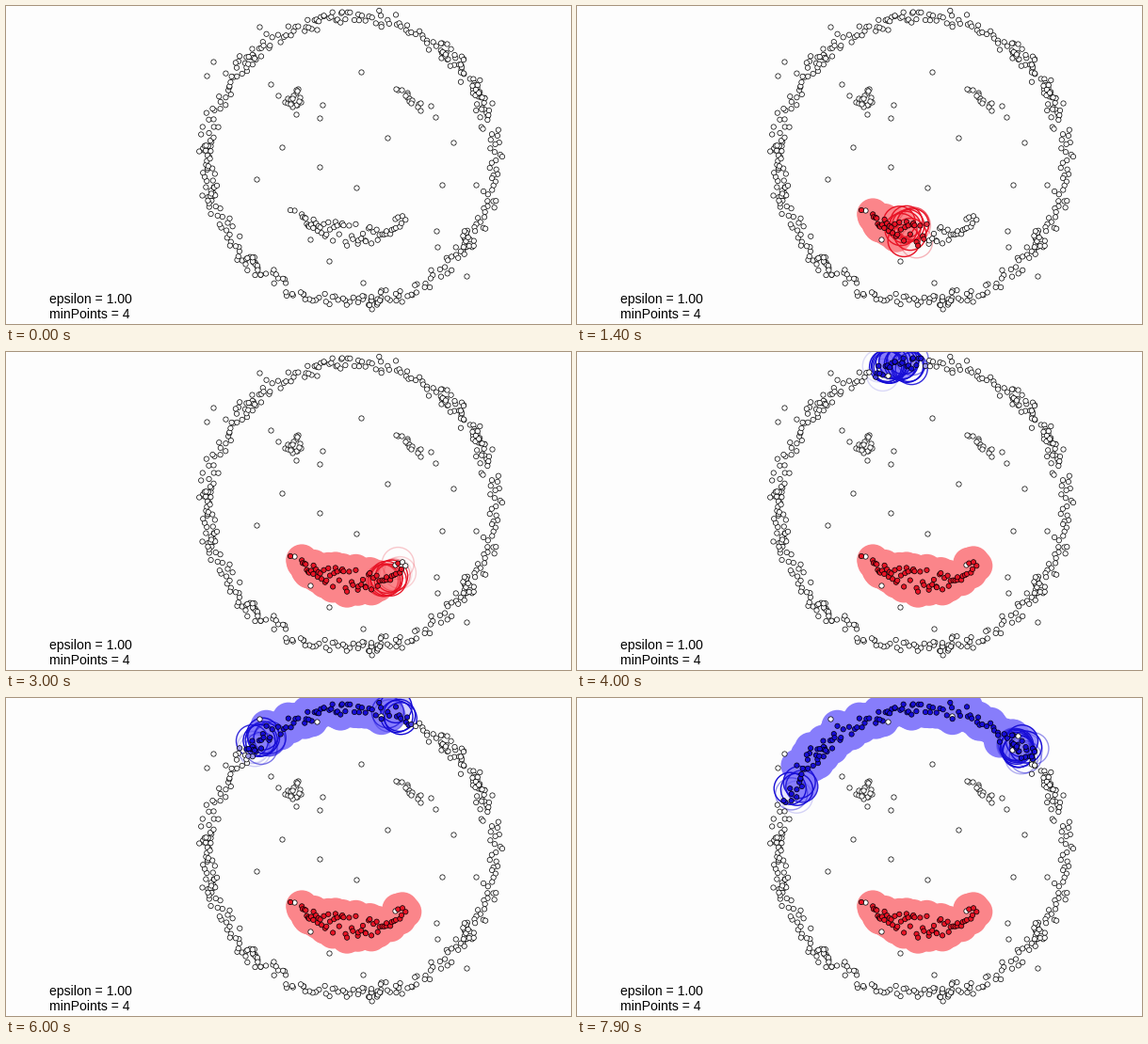
Recreate the animation shown at these times as a matplotlib script. Size 600 px wide and 338 px high, loop 8 s.

```python
import numpy as np
import matplotlib.pyplot as plt
from matplotlib.animation import FuncAnimation

W, H, DPI = 600, 338, 64
PT = 72 / DPI              # points per pixel
STEP, FRAMES = 100, 80
EPS, MIN_PTS = 17, 4
CX, CY, R = 366, 163, 152  # face outline
BG = "#fdfdfd"
RED, PALE_RED = (0.91, 0.08, 0.15), (0.985, 0.52, 0.54)
BLUE, PALE_BLUE = (0.09, 0.05, 0.84), (0.53, 0.49, 0.985)

rng = np.random.default_rng(12)


def spread(n):
    """n sorted random values that cover 0..1 evenly."""
    return (np.arange(n) + rng.random(n)) / n


def make_noise(cells=6):
    """One loose point per cell of a coarse grid."""
    cell = np.stack(np.meshgrid(range(cells), range(cells)), -1).reshape(-1, 2)
    return [207, 14] + (cell + rng.random(cell.shape)) / cells * [313, 284]


def make_eyes():
    left = rng.normal((304, 100), (7, 7), (21, 2))
    u = spread(15)[:, None]
    right = (417, 89) + u * (24, 19) + rng.normal(0, 3, (15, 2))
    return np.vstack([left, right])


def make_mouth(n=60):
    """A sagging band, thick in the middle, with one stray at its left end."""
    u = spread(n) ** 1.15
    mid = 225 + 72 * u * (1 - u)
    half = 4 + 9 * np.sin(np.pi * u)
    y = mid + half * rng.uniform(-1, 1, n)
    return np.vstack([(302, 217), np.column_stack([314 + 111 * u, y])])


def make_ring():
    """Even outline plus denser clumps; angles run clockwise from the left."""
    clumps = [(4, 10), (45, 12), (76, 6), (136, 14), (155, 16), (215, 18),
              (257, 14), (315, 9), (345, 9)]
    deg = np.concatenate([360 * spread(290)] +
                         [rng.normal(a, 4, n) for a, n in clumps])
    a = np.radians(deg)
    r = R + np.clip(rng.normal(0, 4.5, len(a)), -9, 9)
    return deg, np.column_stack([CX - r * np.cos(a), CY - r * np.sin(a)])


def rgba(color, alpha):
    return np.column_stack([np.tile(color, (len(alpha), 1)), alpha])


def ramp(t, length):
    return np.clip(t / length, 0, 1)


def draw_dots(xy):
    return ax.scatter(*xy.T, s=(5.3 * PT) ** 2, facecolor="white",
                      edgecolor="black", lw=0.7 * PT, zorder=3)


class Cluster:
    """Points scanned by a front that moves away from a seed point."""

    def __init__(self, xy, scan, color, pale):
        dist = np.linalg.norm(xy[:, None] - xy[None], axis=2)
        near = dist <= EPS
        core = near.sum(1) >= MIN_PTS
        scan = np.where(core, scan + rng.uniform(-90, 90, len(xy)), np.inf)
        self.found = np.where(near, scan, np.inf).min(1) + 60
        self.scan = scan[core]
        self.color, self.pale = color, pale
        size = (2 * EPS * PT) ** 2
        self.discs = ax.scatter(*xy[core].T, s=size, lw=0, zorder=1)
        self.rings = ax.scatter(*xy[core].T, s=size, lw=1.4 * PT, zorder=2,
                                facecolor="none")
        self.dots = draw_dots(xy)

    def show(self, t):
        age = t - self.scan
        line = ramp(age + 50, 200) * ramp(600 - age, 150)
        self.discs.set_facecolor(rgba(self.pale, ramp(age - 250, 250)))
        self.rings.set_edgecolor(rgba(self.color, line))
        k = ramp(t - self.found, 150)[:, None]
        self.dots.set_facecolor(1 - k * (1 - np.array(self.color)))


fig = plt.figure(figsize=(W / DPI, H / DPI), dpi=DPI, facecolor=BG)
ax = fig.add_axes([0, 0, 1, 1])
ax.set(xlim=(0, W), ylim=(H, 0))
ax.axis("off")

draw_dots(make_noise())
draw_dots(make_eyes())

# Scan times grow with the distance from each seed: px or degrees times ms.
mouth = make_mouth()
smile = Cluster(mouth, 150 + 29 * np.abs(mouth[:, 0] - 317), RED, PALE_RED)
deg, ring = make_ring()
outline = Cluster(ring, 3500 + 77 * np.abs(deg - 80), BLUE, PALE_BLUE)

for y, line in ((316, "epsilon = 1.00"), (332, "minPoints = 4")):
    ax.text(46, y, line, family="Liberation Sans", fontsize=14 * PT,
            color="black", va="baseline", zorder=5)


def update(i):
    t = i * STEP
    smile.show(t)
    outline.show(t)
    return []


anim = FuncAnimation(fig, update, frames=FRAMES, interval=STEP,
                     repeat=True, repeat_delay=0, blit=False)
plt.show()
```
